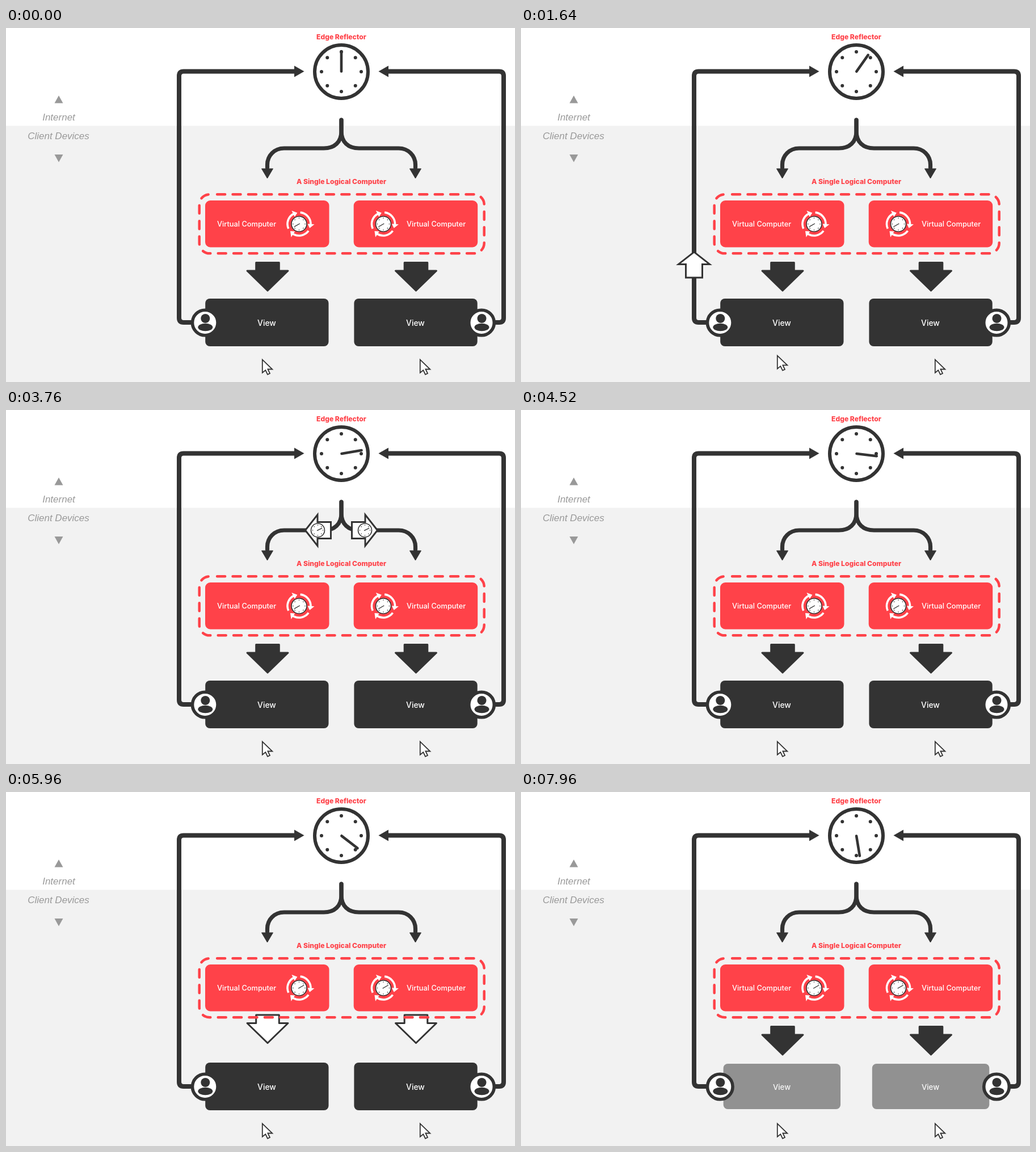
An HTML page that plays this animation: 897x624 px, repeating every 8 s.

```html
<!DOCTYPE html>
<html lang="en">
<head>
<meta charset="utf-8">
<title>Edge Reflector</title>
<style>
  html, body { margin: 0; width: 100%; height: 100%; overflow: hidden; background: #fff; }
  svg { display: block; width: 897px; height: 624px; }
  text { font-family: Inter, "Open Sans", sans-serif; }
  .title { font-size: 12.1px; font-weight: 800; fill: #ff4249; text-anchor: middle; }
  .label { font-size: 12.8px; font-weight: 500; fill: #fff; }
  .view { font-size: 13.9px; font-weight: 500; fill: #fff; text-anchor: middle; }
  .zone { font: italic 17px "Liberation Sans", Arial, sans-serif; fill: #999; text-anchor: middle; }
  .line { fill: none; stroke: #333; stroke-width: 8; }
  .split { stroke-width: 7.2; stroke-linecap: round; }
  .outline { fill: #fff; stroke: #333; stroke-width: 3; }
</style>
</head>
<body>
<svg id="stage" viewBox="0 0 897 624" xmlns="http://www.w3.org/2000/svg"></svg>
<script>
const LOOP = 8000, STEP = 40, DARK = '#333';
const stage = document.getElementById('stage');
const $ = id => document.getElementById(id);

const mirror = inner => inner + `<g transform="matrix(-1 0 0 1 1182 0)">${inner}</g>`;

const dots = (count, radius, size) => Array.from({ length: count }, (_, i) => {
  const a = i * 2 * Math.PI / count;
  return `<circle cx="${radius * Math.sin(a)}" cy="${-radius * Math.cos(a)}" r="${size}" fill="${DARK}"/>`;
}).join('');

const miniClock = (r, cls, angle) => `
  <circle r="${r}" fill="#fff" stroke="${DARK}" stroke-width="1.6"/>${dots(8, r - 3, .8)}
  <path class="${cls}" d="M0 1V${4 - r}" stroke="${DARK}" stroke-width="1.4"
    stroke-linecap="round" transform="rotate(${angle})"/>`;

const polar = (r, deg) => {
  const a = deg * Math.PI / 180;
  return `${r * Math.cos(a)} ${r * Math.sin(a)}`;
};
const ring = [-10, 110, 230].map(turn => `<g transform="rotate(${turn})">
  <path d="M${polar(20.5, -74)}A20.5 20.5 0 0 1 ${polar(20.5, 14)}" fill="none" stroke="#fff" stroke-width="3.6"/>
  <path d="M${polar(15, 9)}L${polar(27, 11)}L${polar(20, 31)}Z" fill="#fff"/></g>`).join('');

const computer = (id, x, textX, iconX) => `<g id="${id}">
  <rect x="${x}" y="304" width="218.5" height="82.5" rx="9" fill="#ff4249"/>
  <text class="label" x="${textX}" y="350">Virtual Computer</text>
  <g transform="translate(${iconX} 345.5)"><g class="ring">${ring}</g>${miniClock(13.5, 'spin', 240)}</g></g>`;

const view = (id, x, textX) => `<g id="${id}">
  <rect x="${x}" y="477" width="217.3" height="84" rx="8" fill="${DARK}"/>
  <text class="view" x="${textX}" y="525">View</text></g>`;

const person = x => `<g transform="translate(${x} 519.5)">
  <circle r="22.3" fill="#fff" stroke="${DARK}" stroke-width="5.6"/>
  <circle cx=".5" cy="-7.5" r="8" fill="${DARK}"/>
  <ellipse cx=".5" cy="8" rx="13" ry="6.8" fill="${DARK}"/></g>`;

const cursor = (id, x) => `<g id="${id}" transform="translate(${x} 584.7)">
  <path d="M0 0V23L5.5 18.5L9.2 26L13.2 24.2L9.6 16.8H17.5Z" fill="#fff" stroke="${DARK}" stroke-width="1.8"/></g>`;

const downArrow = x => `<g transform="translate(${x} 0)"><path class="down"
  d="M-20.3 413.5H20.3V428H36L0 463L-36 428H-20.3Z"
  fill="${DARK}" stroke="${DARK}" stroke-width="3" stroke-linejoin="round"/></g>`;

const mover = (id, clock) => `<g id="${id}" opacity="0">
  <path class="outline" d="M22 0L.5 -27.5V-14.5H-23V14.5H.5V27.5Z"/>
  ${clock ? `<g class="face">${miniClock(12, 'stamp', 64)}</g>` : ''}</g>`;

const upRoute = 'M348 519H313Q305 519 305 511V84.5Q305 76.5 313 76.5H';
const splitRoute = (side, endY) => {
  const x = d => 591 + side * d;
  return `M591 162V182C591 201 ${x(12)} 212 ${x(31)} 212H${x(101)}C${x(118)} 212 ${x(130.5)} 225 ${x(130.5)} 241V${endY}`;
};

stage.innerHTML = `
  <rect y="172.4" width="897" height="452" fill="#f2f2f2"/>
  <path d="M93 119L100.5 132.5H85.5ZM85.5 223H100.5L93 236.5Z" fill="#999"/>
  <text class="zone" x="93" y="163">Internet</text>
  <text class="zone" x="92.5" y="195.6">Client Devices</text>
  <text class="title" x="591" y="19.5">Edge Reflector</text>
  <text class="title" x="591" y="275">A Single Logical Computer</text>
  ${mirror(`<path class="line" d="${upRoute}510"/>
    <path d="M508 66.5L525.5 76.5L508 86.5Z" fill="${DARK}"/>
    <path class="line split" d="${splitRoute(-1, 246)}"/>
    <path d="M450.5 248H470.5L460.5 265Z" fill="${DARK}" stroke="${DARK}" stroke-linejoin="round"/>`)}
  <path id="routeUp" d="${upRoute}515" fill="none"/>
  <path id="routeLeft" d="${splitRoute(-1, 265)}" fill="none"/>
  <path id="routeRight" d="${splitRoute(1, 265)}" fill="none"/>
  ${mover('moverUp')}
  <g id="clock"><g transform="translate(591 77)">
    <circle r="47" fill="#fff" stroke="${DARK}" stroke-width="6"/>${dots(8, 35, 3)}
    <path id="hand" d="M0 -.5V-36" stroke="${DARK}" stroke-width="4.6" stroke-linecap="round"/></g></g>
  ${mover('moverLeft', true)}${mover('moverRight', true)}
  ${downArrow(461)}${downArrow(722.5)}
  <rect x="340.7" y="293.3" width="502" height="104" rx="18" fill="none" stroke="#ff4249"
    stroke-width="4.5" stroke-linecap="round" stroke-dasharray="14 13.4" stroke-dashoffset="14"/>
  ${computer('pcLeft', 351, 372, 516.5)}${computer('pcRight', 612.7, 706, 665)}
  ${view('viewLeft', 351.2, 459.5)}${view('viewRight', 613.4, 721.5)}
  ${person(350.8)}${person(838)}
  ${cursor('pointer', 451.8)}${cursor('idle', 729.8)}`;

const clamp = v => Math.min(1, Math.max(0, v));
const progress = (t, from, to) => clamp((t - from) / (to - from));
const smooth = u => (1 - Math.cos(Math.PI * u)) / 2;

// Piecewise eased value from [time, value] stops.
function along(t, stops) {
  let i = 1;
  while (i < stops.length - 1 && t > stops[i][0]) i++;
  const [t0, v0] = stops[i - 1], [t1, v1] = stops[i];
  return v0 + (v1 - v0) * smooth(progress(t, t0, t1));
}

const dip = (t, start, count) => {
  const u = (t - start) / 600;
  return u > 0 && u < count ? (1 - Math.cos(2 * Math.PI * u)) / 2 : 0;
};

function pulse(id, cx, cy, amount) {
  const k = 1 - .05 * amount;
  $(id).setAttribute('transform', `translate(${cx * (1 - k)} ${cy * (1 - k)}) scale(${k})`);
  $(id).setAttribute('opacity', 1 - .5 * amount);
}

function travel(id, routeId, t, from, to) {
  const el = $(id), route = $(routeId), length = route.getTotalLength();
  const s = length * progress(t, from, to);
  const p = route.getPointAtLength(s);
  const a = route.getPointAtLength(Math.max(0, s - 2));
  const b = route.getPointAtLength(Math.min(length, s + 2));
  const angle = Math.atan2(b.y - a.y, b.x - a.x) * 180 / Math.PI;
  el.setAttribute('transform', `translate(${p.x} ${p.y}) rotate(${angle})`);
  el.setAttribute('opacity', clamp((t - from + 40) / 80) * clamp((to + 40 - t) / 80));
  const face = el.querySelector('.face');
  if (face) face.setAttribute('transform', `rotate(${-angle})`);
}

const each = (selector, fn) => stage.querySelectorAll(selector).forEach(fn);

function draw(t) {
  $('hand').setAttribute('transform', `rotate(${t * .02143})`);

  const lift = along(t, [[0, 0], [100, 0], [600, 1], [1200, 1]]) - progress(t, 1200, 1697);
  $('pointer').setAttribute('transform', `translate(451.8 ${584.7 - 62 * lift})`);

  travel('moverUp', 'routeUp', t, 1335, 2815);
  travel('moverLeft', 'routeLeft', t, 3380, 4380);
  travel('moverRight', 'routeRight', t, 3380, 4380);
  pulse('clock', 591, 77, dip(t, 2820, 1));

  const work = dip(t, 4708, 2), turn = progress(t, 4708, 5908);
  pulse('pcLeft', 460.2, 345.2, work);
  pulse('pcRight', 722, 345.2, work);
  each('.spin', el => el.setAttribute('transform', `rotate(${240 + 180 * turn})`));
  each('.ring', el => el.setAttribute('transform', `rotate(${360 * turn})`));

  const drop = along(t, [[5640, 0], [5960, -20.5], [6600, 14], [7060, 0]]);
  const white = progress(t, 5640, 5900) - progress(t, 7060, 7660);
  const shade = Math.round(51 + 204 * white);
  each('.down', el => {
    el.setAttribute('transform', `translate(0 ${drop})`);
    el.setAttribute('fill', `rgb(${shade},${shade},${shade})`);
  });

  const refresh = dip(t, 7060, 2);
  pulse('viewLeft', 459.8, 519, refresh + dip(t, 600, 1));
  pulse('viewRight', 722, 519, refresh);
}

function frame() {
  const t = performance.now() % LOOP;
  draw(Math.floor(t / STEP) * STEP);
  requestAnimationFrame(frame);
}
frame();
</script>
</body>
</html>
```
